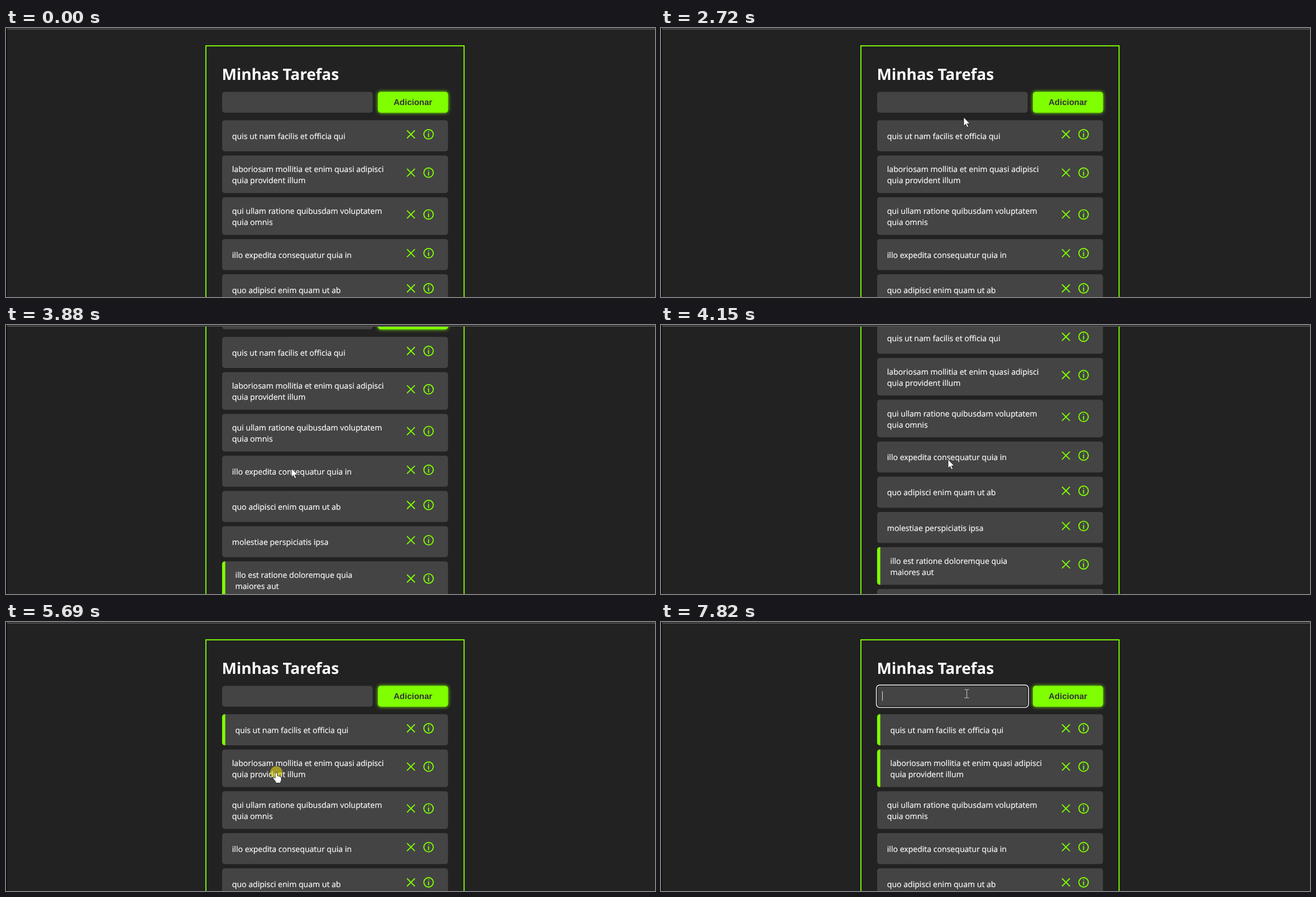
Recreate the animation shown at these times as an HTML page. Size 1162x482 px, loop 8 s.

```html
<!DOCTYPE html>
<html lang="pt">
<head>
<meta charset="utf-8">
<title>Minhas Tarefas</title>
<style>
  html, body { margin: 0; width: 100%; height: 100%; overflow: hidden; background: #222; }
  svg { display: block; width: 100%; height: 100%; }
  text { font: 14.08px "Open Sans", "Noto Sans", sans-serif; fill: #fff; text-rendering: geometricPrecision; }
  #list text { stroke: #fff; stroke-width: .2; }
  #title { font-size: 28px; font-weight: 700; letter-spacing: -.12px; }
  #label { font: 700 15px "Liberation Sans", Arial, sans-serif; text-anchor: middle; }
  .card { fill: #444; }
  .icon { fill: none; stroke: #7fff00; stroke-width: 1.9; stroke-linecap: round; }
  .bar { fill: #7fff00; }
  .cursor { fill: #fff; stroke: #111; stroke-width: .8; stroke-linejoin: round; }
</style>
</head>
<body>
<svg viewBox="0 0 1162 482" preserveAspectRatio="none">
  <defs>
    <path id="cross" class="icon" d="M718.5 -6.5l13 13m0 -13l-13 13"/>
    <g id="info" class="icon">
      <circle cx="756.6" r="8.45"/>
      <path d="M756.6 -1v5.6m0 -9.1v.01"/>
    </g>
  </defs>
  <rect width="1162" height="482" fill="#222"/>
  <g id="page">
    <rect x="357.9" y="31.9" width="462.3" height="1200" fill="none" stroke="#7fff00" stroke-width="1.9"/>
    <text id="title" x="386.5" y="93">Minhas Tarefas</text>
    <rect class="card" x="387" y="114.4" width="269.6" height="37.3" rx="4.7"/>
    <g id="focus" fill="none">
      <rect x="387" y="114.4" width="269.6" height="37.3" rx="4.7" stroke="#101010" stroke-width="1.8"/>
      <rect x="385.6" y="113" width="272.4" height="40.1" rx="6" stroke="#fff" stroke-width="1.4"/>
      <path d="M396.5 124v17" stroke="#ddd"/>
    </g>
    <rect id="button" x="666" y="114.4" width="125.4" height="37.3" rx="4.7"/>
    <text id="label" x="728.6" y="138">Adicionar</text>
    <g id="list"></g>
  </g>
  <path d="M0 1h1162" stroke="#2b2b2b" stroke-width="2"/>
  <path d="M2 2.2h1160" stroke="#555" stroke-width="1.6"/>
  <path d="M1 0v482" stroke="#0c0c0c" stroke-width="2"/>
  <g id="pointer">
    <circle id="click" r="11" fill="#fff000" fill-opacity=".5"/>
    <path id="arrow" class="cursor" d="M0 0V15.5L3.6 12.2 6 17.8 8.6 16.7 6.2 11.3H11Z"/>
    <path id="hand" class="cursor" d="M-2 1.5Q0 -1 2 1.5V6.5Q4 5.5 5 7.2Q7 6.5 7.4 8.3Q9 8 9 10V13Q9 15.5 7.5 17V19H-1V17Q-4 13 -6 10.5Q-6.5 8 -4 8.6L-2 10.5Z"/>
    <path id="beam" fill="none" stroke="#ccc" d="M-4 -7.5h3q1 0 1 1v13q0 1 -1 1h-3M4 -7.5h-3q-1 0 -1 1v13q0 1 1 1h3"/>
  </g>
</svg>
<script>
const LOOP = 8000;
const $ = id => document.getElementById(id);
const clamp = v => Math.max(0, Math.min(1, v));
const progress = (t, a, b) => clamp((t - a) / (b - a));
const smooth = p => p * p * (3 - 2 * p);
const wheel = p => 1 - (1 - p) ** 1.44;
const mix = (a, b, k) => `rgb(${a.map((v, i) => Math.round(v + (b[i] - v) * k))})`;
const show = (el, on) => el.setAttribute("visibility", on ? "visible" : "hidden");

// Each task: text lines, time it becomes done
const tasks = [
  { lines: ["quis ut nam facilis et officia qui"], done: 5090 },
  { lines: ["laboriosam mollitia et enim quasi adipisci", "quia provident illum"], done: 5830 },
  { lines: ["qui ullam ratione quibusdam voluptatem", "quia omnis"] },
  { lines: ["illo expedita consequatur quia in"] },
  { lines: ["quo adipisci enim quam ut ab"] },
  { lines: ["molestiae perspiciatis ipsa"] },
  { lines: ["illo est ratione doloremque quia", "maiores aut"], done: 0 },
  { lines: ["vero rerum temporibus dolor"] }
];

// Pointer moves: from time, to time, end point
const entry = { x: 1147, y: 455 };
const moves = [
  [190, 680, 603, 125],
  [680, 970, 719, 142],
  [2050, 2720, 542, 160],
  [2720, 2850, 528, 191],
  [2920, 3740, 510, 263],
  [3740, 4150, 514, 241],
  [4150, 4490, 500, 171],
  [4690, 4750, 495, 190.5],
  [5360, 5490, 484, 269.5],
  [6230, 6960, 724, 187],
  [7290, 7620, 547.5, 128.5]
];
const clicks = [[4890, 5090], [5690, 5830], [7620, 7820]];

let rowTop = 165.3;
$("list").innerHTML = tasks.map(({ lines }, i) => {
  const two = lines.length > 1, h = two ? 67.4 : 55.6, y = rowTop;
  rowTop += h + 7.5;
  const iconY = two ? 30.8 : 25.2, base = two ? 30 : 33.7;
  const text = lines.map((s, n) => `<text x="404.8" y="${base + 20 * n}">${s}</text>`).join("");
  return `<g transform="translate(0 ${y})">
    <rect class="card" x="387" width="404.4" height="${h}" rx="4.7"/>
    <path class="bar" id="bar${i}" d="M392.6 0v${h}h-1a4.7 4.7 0 0 1 -4.7 -4.7v${9.4 - h}a4.7 4.7 0 0 1 4.7 -4.7z"/>
    <g id="text${i}">${text}</g>
    <use href="#cross" y="${iconY}"/><use href="#info" y="${iconY}"/></g>`;
}).join("");

function pointerAt(t) {
  let { x, y } = entry;
  for (const [a, b, endX, endY] of moves) {
    const p = smooth(progress(t, a, b));
    x += (endX - x) * p;
    y += (endY - y) * p;
  }
  return [x, y];
}

function cursorKind(x, y, t) {
  const scrolling = t > 3650 && t < 4690;
  if (scrolling || x > 792 || y > 152 && y < 165) return "arrow";
  if (y > 152) return "hand";
  return x < 657 ? "beam" : x > 666 ? "hand" : "arrow";
}

function draw(t) {
  const scroll = 187.2 * (wheel(progress(t, 3650, 4010)) - wheel(progress(t, 4126, 4486)));
  $("page").setAttribute("transform", `translate(0 ${-scroll})`);

  const hover = progress(t, 970, 1250) - progress(t, 2120, 2400);
  const color = mix([127, 255, 0], [255, 19, 189], hover);
  $("button").style.fill = color;
  $("button").style.filter = `drop-shadow(0 0 3px ${color})`;
  $("label").style.fill = mix([51, 51, 51], [255, 255, 255], hover);

  tasks.forEach(({ done }, i) => {
    const isDone = t >= done;
    show($("bar" + i), isDone);
    $("text" + i).setAttribute("transform", `translate(${isDone ? 5.6 : 0} 0)`);
  });
  show($("focus"), t >= 7620);

  const [x, y] = pointerAt(t);
  const kind = t >= 190 ? cursorKind(x, y, t) : "";
  $("pointer").setAttribute("transform", `translate(${x} ${y})`);
  for (const id of ["arrow", "hand", "beam"]) show($(id), id === kind);
  show($("click"), clicks.some(([a, b]) => t >= a && t < b));
}

let start;
function frame(now) {
  start ??= now;
  draw((now - start) % LOOP);
  requestAnimationFrame(frame);
}
draw(0);
requestAnimationFrame(frame);
</script>
</body>
</html>
```
